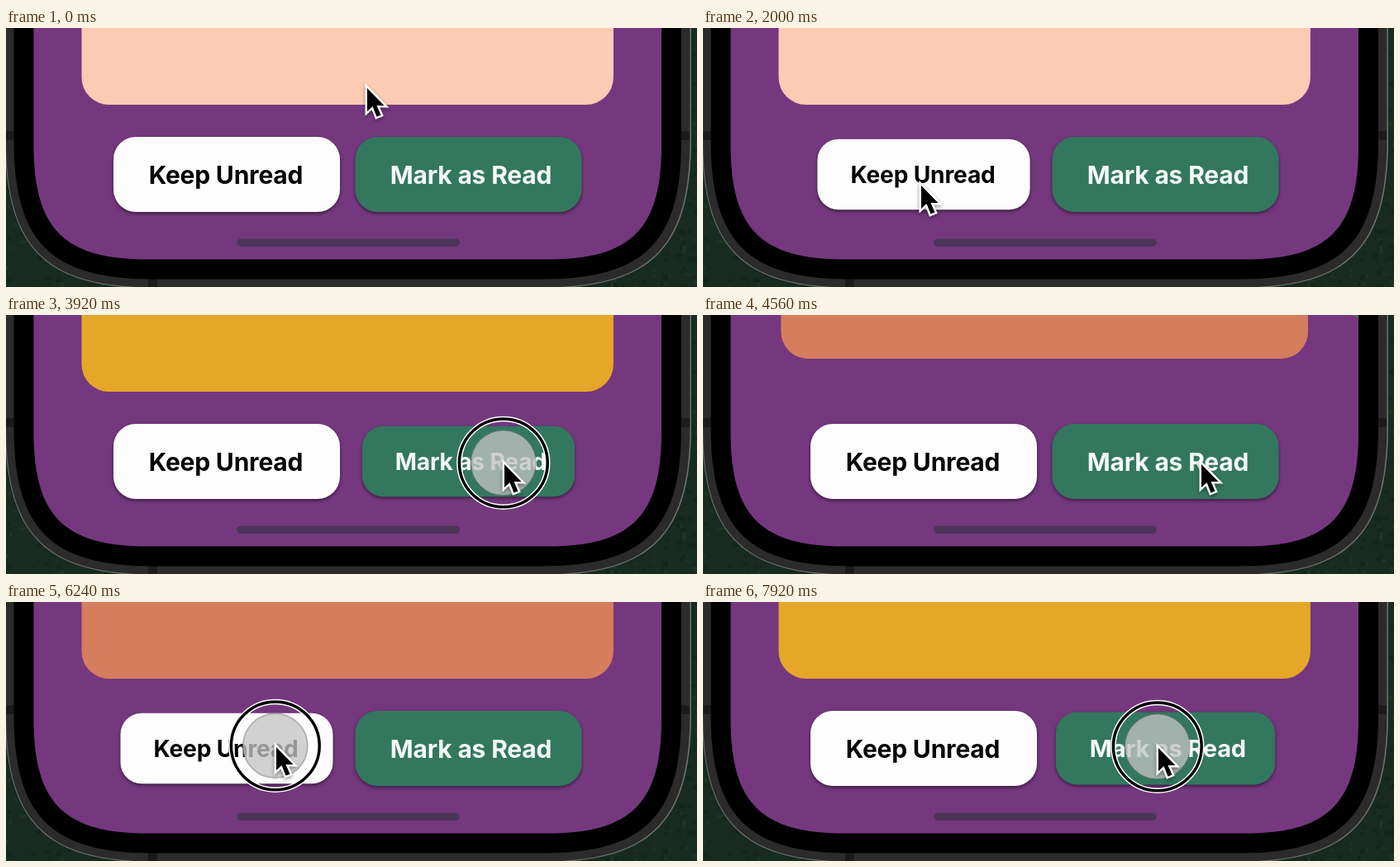
An HTML page with a canvas that plays this animation: 836 by 314 pixels, repeating every 8 s.

```html
<!DOCTYPE html>
<html lang="en">
<head>
<meta charset="utf-8">
<title>Card deck</title>
<style>
html, body { margin: 0; width: 100%; height: 100%; overflow: hidden; background: #172b20; }
canvas { display: block; }
</style>
</head>
<body>
<canvas id="stage" width="836" height="314"></canvas>
<script>
const LOOP = 8000, FLIGHT = 320, PROMOTE = 200;
const PURPLE = '#75387f', GREEN = '#33775e', WHITE = '#fdfdfd';
const ctx = document.getElementById('stage').getContext('2d');

const deck = ['#fbcbb4', '#e5a727', '#d67d5d', '#e5a727', '#fbcbb4'];
// side -1 is "Keep Unread" (left), 1 is "Mark as Read" (right)
const clicks = [
  { side: -1, down: 1720, up: 1990, fly: 2190 },
  { side: 1, down: 3720, up: 4050, fly: 4260 },
  { side: -1, down: 6120, up: 6350, fly: 6550 },
  { side: 1, down: 7860, up: 8200, fly: 9000 }
];
const path = [
  [0, 435, 69], [900, 435, 69], [1600, 262, 187], [2400, 262, 187],
  [2900, 430, 72], [3600, 601, 177], [5000, 601, 177], [5450, 450, 66],
  [6050, 325, 172], [6600, 325, 172], [7080, 430, 70], [7700, 549, 173], [8000, 549, 173]
];

const clamp = x => Math.min(1, Math.max(0, x));
const mix = (a, b, u) => a + (b - a) * u;
const smooth = u => u * u * (3 - 2 * u);
const easeOut = u => 1 - (1 - u) ** 3;

function box(x, y, w, h, r, fill) {
  ctx.beginPath();
  ctx.roundRect(x, y, w, h, r);
  ctx.fillStyle = fill;
  ctx.fill();
}

// Phone outline: two bottom corners with continuous curvature
function shell(left, right, bottom, r, fill) {
  const d = 1.3 * r, k = .348 * r;
  ctx.beginPath();
  ctx.moveTo(left, -10);
  ctx.lineTo(left, bottom - d);
  ctx.bezierCurveTo(left, bottom - k, left + k, bottom, left + d, bottom);
  ctx.lineTo(right - d, bottom);
  ctx.bezierCurveTo(right - k, bottom, right, bottom - k, right, bottom - d);
  ctx.lineTo(right, -10);
  ctx.fillStyle = fill;
  ctx.fill();
}

function foliage() {
  let seed = 7;
  const rnd = () => (seed = seed * 16807 % 2147483647) / 2147483647;
  ctx.fillStyle = '#172b20';
  ctx.fillRect(0, 0, 836, 314);
  for (let i = 0; i < 700; i++) {
    const x = (i % 2 ? 690 : 0) + rnd() * 146, y = rnd() * 314;
    ctx.fillStyle = `rgba(${rnd() < .5 ? '48,80,54' : '10,24,16'},.25)`;
    ctx.fillRect(x, y, 2 + rnd() * 5, 2 + rnd() * 4);
  }
}

function phone() {
  shell(-1, 829, 315.5, 139, '#727473');
  shell(0, 827.5, 314.5, 138, '#2b2b2c');
  ctx.fillStyle = '#1b1b1c';
  ctx.fillRect(172, 303, 11, 11);
  ctx.fillRect(0, 125, 12, 11);
  ctx.fillRect(815, 125, 12, 11);
  shell(9.5, 817, 304.5, 129, '#000');
}

function card(fill, dx, dy, scale, angle, tint, alpha) {
  ctx.save();
  ctx.translate(413.2 + dx, -400 + dy);
  ctx.rotate(angle);
  ctx.scale(scale, scale);
  box(-321.7, -493, 643.4, 986, 33, fill);
  if (alpha) {
    ctx.globalAlpha = alpha;
    box(-321.7, -493, 643.4, 986, 33, tint);
  }
  ctx.restore();
}

function cards(t) {
  const started = clicks.filter(c => t >= c.fly);
  const n = started.length, last = started[n - 1];
  const age = last ? t - last.fly : Infinity;
  const rise = easeOut(clamp((age - FLIGHT) / PROMOTE));
  card(deck[n], 0, mix(-35.5, 0, rise), mix(.991, 1, rise), 0);
  if (age < FLIGHT) {
    const u = (age / FLIGHT) ** 2;
    card(deck[n - 1], last.side * 805 * u, 0, 1, last.side * .4 * u,
      last.side < 0 ? WHITE : GREEN, clamp(u * 2));
  }
}

function button(t, side, x, fill, ink, label, shift) {
  let press = 0;
  for (const c of clicks)
    if (c.side === side && t >= c.down)
      press = smooth(clamp((t - c.down) / 120)) * (1 - smooth(clamp((t - c.up) / 180)));
  const s = 1 - .062 * press;
  ctx.save();
  ctx.translate(x, 177.5);
  ctx.scale(s, s);
  ctx.shadowColor = 'rgba(0,0,0,.5)';
  ctx.shadowBlur = 4;
  ctx.shadowOffsetY = 2;
  box(-137, -45.5, 274, 91, 27, fill);
  ctx.shadowColor = 'transparent';
  ctx.fillStyle = ink;
  ctx.fillText(label, shift, 11);
  ctx.restore();
}

function circle(r, width, color) {
  ctx.beginPath();
  ctx.arc(.8, 2.3, r, 0, 7);
  ctx.lineWidth = width;
  ctx.strokeStyle = color;
  ctx.stroke();
}

function pointer(t) {
  const i = path.findIndex((p, k) => k && t <= p[0]);
  const a = path[i - 1], b = path[i];
  const u = smooth((t - a[0]) / (b[0] - a[0]));
  ctx.save();
  ctx.translate(mix(a[1], b[1], u), mix(a[2], b[2], u));
  if (clicks.some(c => t >= c.down && t < c.up)) {
    circle(53.4, 6.5, '#fff');
    circle(53.4, 3.5, '#000');
    circle(38.8, 2, 'rgba(130,130,130,.7)');
    ctx.fillStyle = 'rgba(196,196,196,.76)';
    ctx.fill();
  }
  const arrow = new Path2D('M2 4V32L8.5 26L13.5 38.5L18.5 36.5L13.5 25H22.5Z');
  ctx.lineWidth = 5;
  ctx.strokeStyle = '#fff';
  ctx.shadowColor = 'rgba(0,0,0,.4)';
  ctx.shadowBlur = 4;
  ctx.shadowOffsetY = 2;
  ctx.stroke(arrow);
  ctx.shadowColor = 'transparent';
  ctx.fillStyle = '#000';
  ctx.fill(arrow);
  ctx.restore();
}

function draw(t) {
  foliage();
  phone();
  ctx.save();
  shell(33.5, 793, 280.5, 106, PURPLE);
  ctx.clip();
  cards(t);
  ctx.font = '700 30px Inter, "Liberation Sans", sans-serif';
  ctx.letterSpacing = '-0.2px';
  ctx.textAlign = 'center';
  button(t, -1, 267, WHITE, '#050505', 'Keep Unread', -1);
  button(t, 1, 559.5, GREEN, '#f4faf7', 'Mark as Read', 3);
  box(279, 255.5, 270, 9.5, 5, '#4c3459');
  ctx.restore();
  pointer(t);
}

const start = performance.now();
function frame() {
  draw((performance.now() - start) % LOOP);
  requestAnimationFrame(frame);
}
frame();
</script>
</body>
</html>
```
